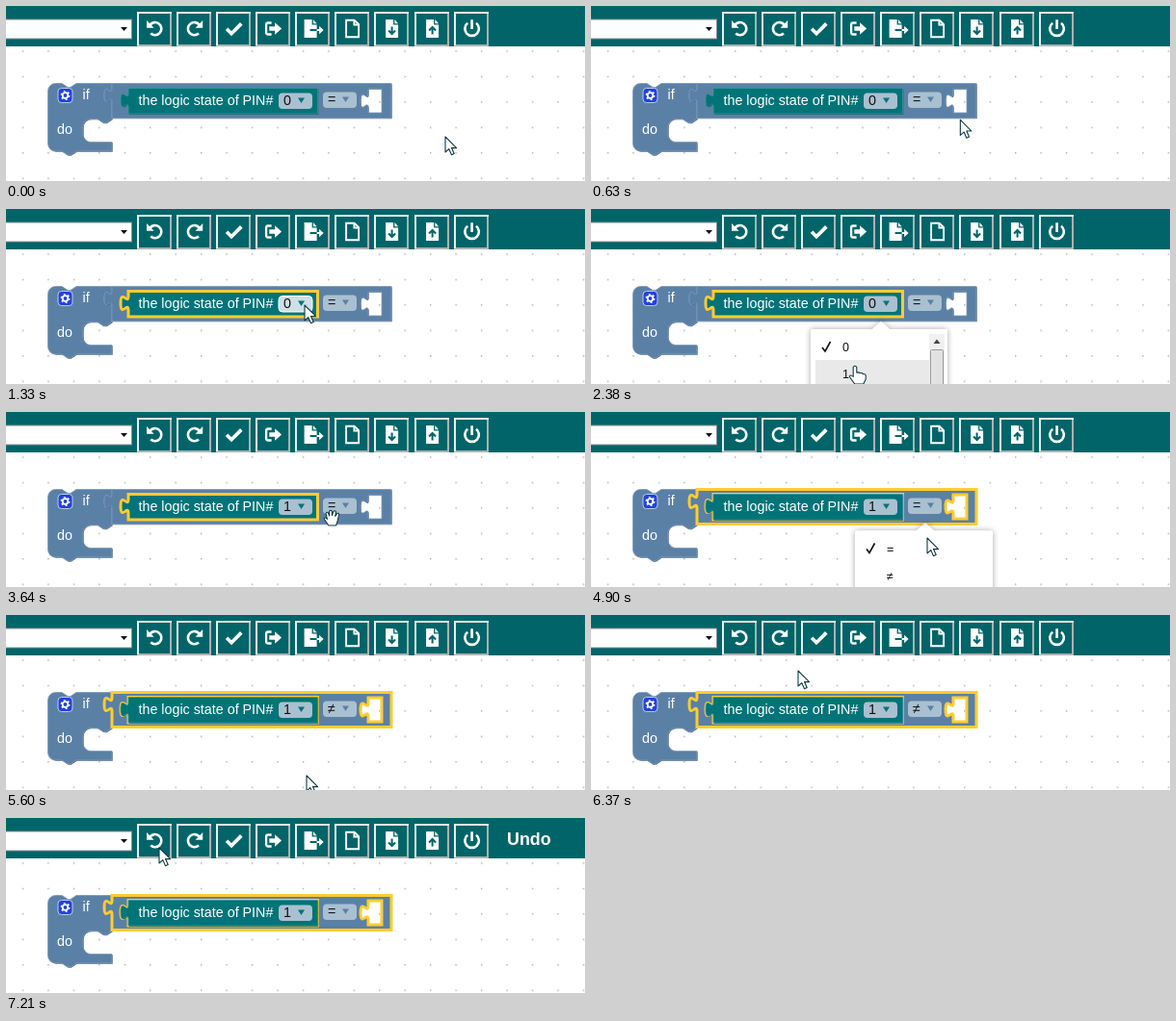
An HTML page that plays this animation: 601x182 px, repeating every 8000 ms.

```html
<!DOCTYPE html>
<html lang="en">
<head>
<meta charset="utf-8">
<title>Block editor</title>
<style>
  html, body { margin: 0; width: 100%; height: 100%; overflow: hidden; background: #fff; }
  svg { display: block; width: 601px; height: 182px; }
  text { font: 14.3px "Liberation Sans", Arial, sans-serif; }
  .label { fill: #fff; }
  .field rect { fill: #a9c0d0; }
  .field.hover rect { fill: #cfdfe6; stroke: #fff; }
  .menu text { font-size: 12.5px; fill: #111; }
  .selected { fill: none; stroke: #fc3; stroke-width: 3; }
  .icon { fill: #fff; }
  .line { fill: none; stroke: #fff; stroke-width: 2.6; }
  .cut { fill: none; stroke: #006468; stroke-width: 2; }
  .edge { fill: none; stroke-width: 2; }
</style>
</head>
<body>
<svg viewBox="0 0 601 182">
  <defs>
    <pattern id="dots" x="16.8" y="46.3" width="26.45" height="26.45" patternUnits="userSpaceOnUse">
      <rect width="1.4" height="1.4" fill="#a8a8a8"/>
    </pattern>
    <filter id="shadow" x="-20%" y="-20%" width="140%" height="140%">
      <feDropShadow dx="0" dy="0" stdDeviation="3" flood-color="#000" flood-opacity=".35"/>
    </filter>
  </defs>
  <rect width="601" height="182" fill="#fff"/>
  <rect y="43" width="601" height="139" fill="url(#dots)"/>
  <g id="toolbar">
    <rect width="601" height="42" fill="#006468"/>
    <rect x="-2" y="14" width="132.5" height="20" fill="#fff" stroke="#868d8d"/>
    <path d="M119 22h7l-3.5 4z" fill="#111"/>
    <text id="hint" class="label" x="520" y="28" style="font-size:17.9px;font-weight:bold">Undo</text>
  </g>
  <g id="blocks"></g>
  <g id="menus" class="menu"></g>
  <g id="cursors"></g>
</svg>
<script>
const LOOP = 8000, STEP = 70;
const $ = id => document.getElementById(id);

function add(parent, tag, attrs = {}, text = "") {
  const node = document.createElementNS("http://www.w3.org/2000/svg", tag);
  for (const key in attrs) node.setAttribute(key, attrs[key]);
  node.textContent = text;
  return parent.appendChild(node);
}
const show = (node, on) => node.setAttribute("visibility", on ? "visible" : "hidden");

// Toolbar
const page = "M-6.5-9.5H1.5V-4H6.5V9.5H-6.5Z M2.8-9.5 6.5-5.3H2.8Z";
const undo = [["line", "M-5.3-3.6A6.6 6.6 0 1 1-4.4 5"], ["icon", "M-8.6-8.4v7.6h7.6z"]];
const icons = [
  undo,
  undo,
  [["line", "M-7.5 .3-2.6 5.2 7.7-5.1", 3.7]],
  [["line", "M-2-6H-5.5a2 2 0 0 0-2 2v8a2 2 0 0 0 2 2H-2", 2.3], ["icon", "M-4.3-2.2H1.5v-4l7 6.2-7 6.2v-4H-4.3z"]],
  [["icon", page, 0, -2.5], ["cut", "M-3 1.5H4.5"], ["line", "M4 1.5H8", 2], ["icon", "M6.5-2.8 11 1.5 6.5 5.8z"]],
  [["line", "M-6.5-8.8H2L6.5-4.3V8.8H-6.5Z M1.8-8.8V-4H6.5", 1.9]],
  [["icon", page], ["cut", "M0-2V5M-3.5 2 0 5.5 3.5 2"]],
  [["icon", page], ["cut", "M0 6V-1M-3.5 2 0-1.5 3.5 2"]],
  [["line", "M-4.4-5.7A7.3 7.3 0 1 0 4.4-5.7M0-9.3V.5"]]
];
icons.forEach((parts, i) => {
  const x = 154 + Math.round(i * 41.08);
  add($("toolbar"), "path", { class: "edge", d: `M${x + 17} 6V41H${x - 18}`, stroke: "#a9b3b3" });
  add($("toolbar"), "path", { class: "edge", d: `M${x - 17} 41V7H${x + 18}`, stroke: "#e8eded" });
  const g = add($("toolbar"), "g", { transform: `translate(${x + .6} 23.5) scale(${i === 1 ? -1 : 1} 1)` });
  for (const [kind, d, width, dx = 0] of parts) {
    const path = add(g, "path", { class: kind, d, transform: `translate(${dx})` });
    if (width) path.style.strokeWidth = width;
  }
});

// Blocks
const tabDown = "v5c0 10-8-8-8 7.5s8-2.5 8 7.5";
const tabUp = "c0-10-8 8-8-7.5s8 2.5 8-7.5v-5";
const notchRight = "l6 4 3 0 6-4", notchLeft = "l-6 4-3 0-6-4";
const outputBlock = (l, t, r, b) => `M${l} ${t}H${r}V${b}H${l}V${t + 20}${tabUp}Z`;
const ifPath = `M43.5 88.5a8 8 0 0 1 8-8H58${notchRight}H110${tabDown}V117.5${notchLeft}h-7a8 8 0 0 0-8 8v8a8 8 0 0 0 8 8H110V151H73${notchLeft}H51.5a8 8 0 0 1-8-8Z`;
const socket = `M376 86${tabDown}V111H390V86Z`;
const pinPath = outputBlock(127, 85.5, 323.5, 112);
const comparePath = outputBlock(110, 80.5, 400, 116.5) + socket;

const blocks = $("blocks");
const BLUE = "#5b80a5", TEAL = "#007478";
function block(d, fill, light, dark) {
  add(blocks, "path", { d, fill: dark, transform: "translate(.7 .7)", "fill-rule": "evenodd" });
  add(blocks, "path", { d, fill, stroke: light, "stroke-width": .8, "fill-rule": "evenodd" });
}
const outline = d => add(blocks, "path", { class: "selected", d });
const label = (x, y, text) => add(blocks, "text", { class: "label", x, y }, text);
function field(x, y, color) {
  const g = add(blocks, "g", { class: "field" });
  add(g, "rect", { x, y, width: 35, height: 16.5, rx: 4 });
  const text = add(g, "text", { x: x + 5, y: y + 12.5, fill: "#111" });
  add(g, "path", { d: `M${x + 20} ${y + 5}h7l-3.5 5.5z`, fill: color });
  return { g, text, x, y };
}
const inField = (f, p) => p.x >= f.x && p.x <= f.x + 35 && p.y >= f.y && p.y <= f.y + 16.5;

block(ifPath, BLUE, "#7d9aba", "#496684");
block(comparePath, BLUE, "#7d9aba", "#496684");
// The selection also rims the hole that holds the inner block.
const compareOutline = outline(comparePath + pinPath);
block(pinPath, TEAL, "#3f9699", "#004c50");
add(blocks, "rect", { x: 54, y: 85.5, width: 15, height: 15, rx: 3.5, fill: "#2343dc", stroke: "#bccbe6" });
add(blocks, "circle", { cx: 61.5, cy: 93, r: 2.8, fill: "none", stroke: "#fff", "stroke-width": 1.8 });
add(blocks, "circle", { cx: 61.5, cy: 93, r: 4.2, fill: "none", stroke: "#fff", "stroke-width": 1.5, "stroke-dasharray": "1.8 2.6" });
label(79.5, 97, "if");
label(53, 133, "do");
label(137.5, 103, "the logic state of PIN#");
const pinField = field(283, 90.5, TEAL), compareField = field(329, 89.5, BLUE);
const pinOutline = outline(pinPath);

// Menus
function menu(left, top, right, peak, options, scroll) {
  const g = add($("menus"), "g");
  add(g, "path", {
    d: `M${left} 200V${top + 2}q0-2 2-2H${peak - 9}l9-8 9 8H${right - 2}q2 0 2 2V200Z`,
    fill: "#fff", filter: "url(#shadow)"
  });
  const first = top + 4;
  const band = add(g, "rect", { x: left + 5, width: right - left - (scroll ? 24 : 10), height: 28, fill: "#e9e9e9" });
  add(g, "path", { d: `M${left + 12} ${top + 19}l3 4 5.5-10`, fill: "none", stroke: "#111", "stroke-width": 1.6 });
  options.forEach((text, i) => add(g, "text", { x: left + 33, y: top + 23 + i * 28 }, text));
  if (scroll) {
    const x = right - 19;
    add(g, "rect", { x, y: top + 5, width: 16, height: 60, fill: "#f0f0f0" });
    add(g, "path", { d: `M${x + 4.5} ${top + 15}l3.5-4.5 3.5 4.5z`, fill: "#444" });
    add(g, "rect", { x: x + 1.5, y: top + 21.5, width: 13, height: 50, rx: 1, fill: "#e2e2e2", stroke: "#999" });
  }
  return { g, band, first, left, right };
}
const pinMenu = menu(228, 125, 370, 301, ["0", "1"], true);
const compareMenu = menu(274, 123.5, 417, 347, ["=", "≠"], false);

function drawMenu(m, t, open, close, p) {
  const on = t >= open && t < close;
  const k = Math.min(1, (t - open + STEP) / 280);
  m.g.setAttribute("display", on ? "inline" : "none");
  m.g.setAttribute("opacity", k);
  m.g.setAttribute("transform", `translate(0 ${(k - 1) * 5})`);
  const over = on && p.y >= m.first + 5 && p.x > m.left && p.x < m.right;
  show(m.band, over);
  if (over) m.band.setAttribute("y", m.first + 28 * Math.floor((p.y - m.first) / 28));
  return over;
}

// Cursors, each drawn around its hot spot
const shapes = {
  arrow: "M0 0V16L3.8 12.6 6.5 18.8 9.2 17.6 6.5 11.6H11.6Z",
  pointer: "M-1.8 1.5Q0-1 1.8 1.5V7.2q2-1 3.4.6 2-.8 3.2.8 2-.4 2.8 1.4V14L8.8 19H-.2L-5.8 11.2q.6-2.6 4 .2Z",
  hand: "M-3.2 8-7.8 1.2q.3-2.4 3.2.2L-6-4.6q1.2-2.3 2.7 0l.9 2.6V-6.6q1.4-2.3 2.8 0v4.2L1.9-6.4q1.7-1.8 2.6.2L3.8-1.6 5.4-4.3q2-1.3 2.2.8L6 4 4.6 8Z"
};
const cursors = {};
for (const kind in shapes)
  cursors[kind] = add($("cursors"), "path", { d: shapes[kind], fill: "#fff", stroke: "#0e3a44", "stroke-width": 1.1, "stroke-linejoin": "round" });

// Time, x, y of the pointer
const route = [
  [0, 456, 136], [210, 450, 134], [280, 450, 134], [910, 330, 106], [1050, 330, 106],
  [1260, 310, 100], [1890, 310, 100], [2380, 274, 163], [2940, 274, 163],
  [3640, 338, 110], [3780, 346, 101], [4690, 346, 101], [4900, 349, 131],
  [5110, 312, 167], [6020, 312, 167], [6370, 215, 58], [6860, 159, 31], [LOOP, 159, 31]
];
function pointerAt(t) {
  const i = route.findIndex(stop => stop[0] > t);
  const [t0, x0, y0] = route[i - 1], [t1, x1, y1] = route[i];
  const k = (t - t0) / (t1 - t0);
  return { x: x0 + (x1 - x0) * k, y: y0 + (y1 - y0) * k };
}

function draw(time) {
  const t = Math.floor(time % LOOP / STEP) * STEP;
  const p = pointerAt(t);
  pinField.text.textContent = t < 2800 ? "0" : "1";
  compareField.text.textContent = t >= 5600 && t < 6930 ? "≠" : "=";
  show(pinOutline, t >= 1330 && t < 3850);
  show(compareOutline, t >= 3850);

  const overPinMenu = drawMenu(pinMenu, t, 1470, 2800, p);
  const overCompareMenu = drawMenu(compareMenu, t, 4480, 5600, p);
  let overField = false;
  for (const f of [pinField, compareField]) {
    const hover = inField(f, p);
    overField ||= hover;
    f.g.classList.toggle("hover", hover);
  }
  const overBlock = p.x > 43 && p.x < 401 && p.y > 80 && p.y < (p.x < 110 ? 151 : 117);
  const kind = overPinMenu || overCompareMenu ? "pointer" : overBlock && !overField ? "hand" : "arrow";
  for (const name in cursors) show(cursors[name], name === kind);
  $("cursors").setAttribute("transform", `translate(${p.x} ${p.y})`);
  show($("hint"), p.x > 136 && p.x < 172 && p.y > 6 && p.y < 41);
}

const start = performance.now();
function tick() {
  draw(performance.now() - start);
  requestAnimationFrame(tick);
}
tick();
</script>
</body>
</html>
```
